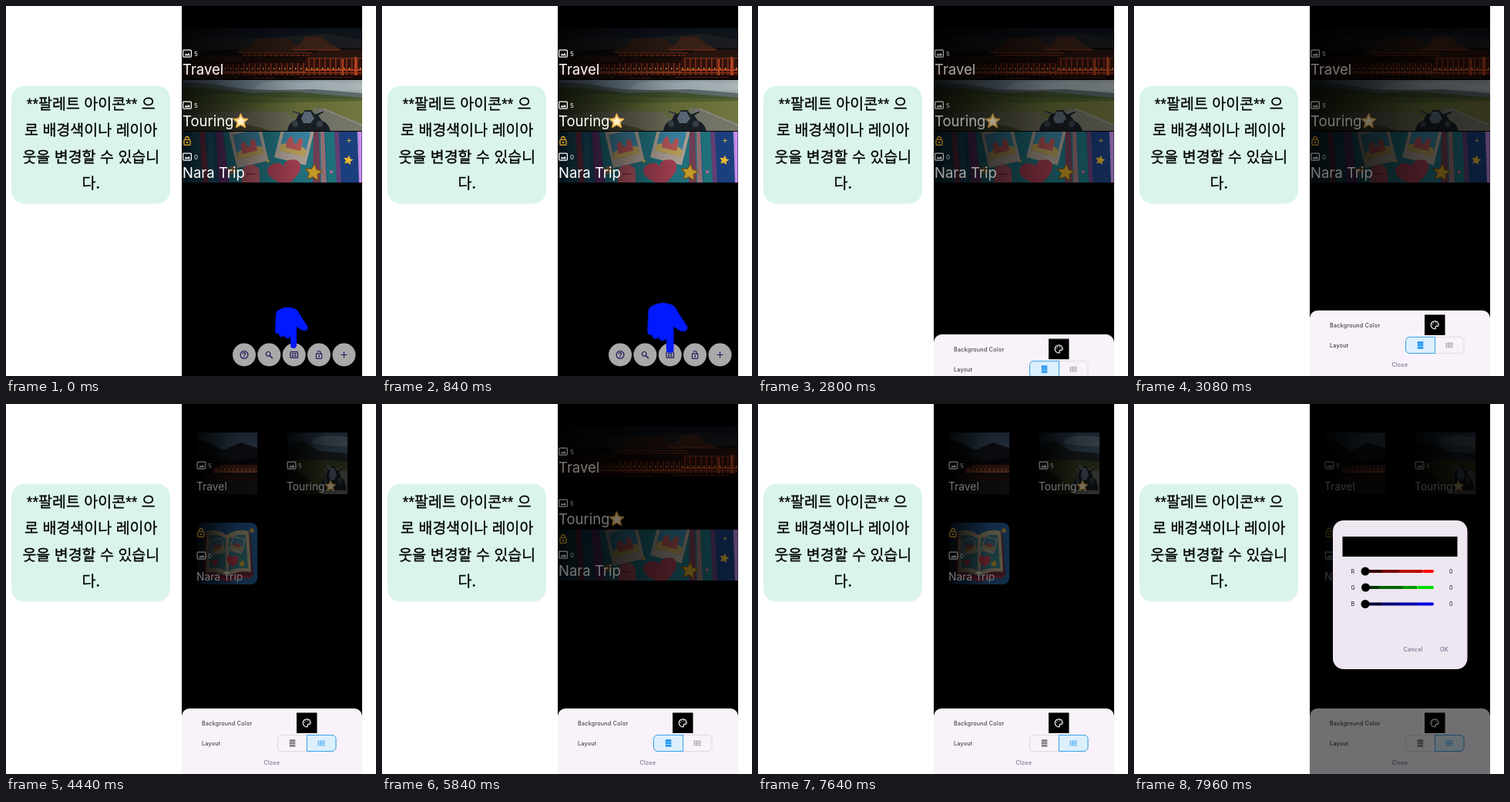
An HTML page that plays this animation: 480 px wide and 480 px high, repeating every 8000 ms.

```html
<!DOCTYPE html>
<html lang="ko">
<head>
<meta charset="utf-8">
<title>Palette icon guide</title>
<style>
html, body { margin: 0; width: 100%; height: 100%; overflow: hidden; background: #fff; }
svg { display: block; width: 100vw; height: 100vh; }
.guide { font: 19.5px "Noto Sans CJK KR", "Noto Sans CJK", sans-serif; text-anchor: middle; stroke: #000; stroke-width: .3; }
.star-mark { font-family: "Liberation Sans", sans-serif; }
.title { font: 18.5px Inter, sans-serif; fill: #fff; }
.grid .title { font-size: 13.8px; }
.count { font: 8px Inter, sans-serif; fill: #fff; }
.label { font: 7.2px Inter, sans-serif; letter-spacing: .27px; fill: #1f1b22; }
.action { fill: #62597a; }
.line { fill: none; stroke: currentColor; stroke-width: 1.2; stroke-linejoin: round; stroke-linecap: round; }

.hand, .sheet, .dim, .list, .grid, .late, .dialog, .dim2 { animation: 8s linear infinite; }
.hand { animation-name: tap; transform-box: fill-box; transform-origin: center; }
.sheet { animation-name: rise; }
.dim { animation-name: dim; }
.list { animation-name: list; animation-timing-function: step-end; }
.grid { animation-name: grid; animation-timing-function: step-end; }
.late { animation-name: late; animation-timing-function: step-end; }
.dialog { animation-name: appear; }
.dim2 { animation-name: dim2; }

@keyframes tap {
  0%, 6% { transform: scale(1); opacity: 1; animation-timing-function: ease-in-out; }
  11.25% { transform: scale(1.23); animation-timing-function: ease-in-out; }
  16.5% { transform: scale(1); }
  16.99% { opacity: 1; }
  17%, 100% { transform: scale(1); opacity: 0; }
}
@keyframes rise {
  0%, 32.5% { transform: translateY(86px); animation-timing-function: ease-out; }
  38%, 100% { transform: none; }
}
@keyframes dim {
  0%, 32.5% { opacity: 0; animation-timing-function: ease-out; }
  38%, 100% { opacity: .54; }
}
@keyframes list { 0% { opacity: 1; } 51.5% { opacity: 0; } 73% { opacity: 1; } 84.5%, 100% { opacity: 0; } }
@keyframes grid { 0% { opacity: 0; } 51.5% { opacity: 1; } 73% { opacity: 0; } 84.5%, 100% { opacity: 1; } }
@keyframes late { 0% { opacity: 1; } 73% { opacity: 0; } 73.5%, 100% { opacity: 1; } }
@keyframes appear { 0%, 95.5% { opacity: 0; animation-timing-function: ease-out; } 98.5%, 100% { opacity: 1; } }
@keyframes dim2 { 0%, 95.5% { opacity: 0; animation-timing-function: ease-out; } 98.5%, 100% { opacity: .54; } }
</style>
</head>
<body>
<svg viewBox="0 0 480 480" preserveAspectRatio="none">
<defs>
  <linearGradient id="night" x2="0" y2="1"><stop stop-color="#0d121b"/><stop offset=".6" stop-color="#16171a"/><stop offset="1" stop-color="#120705"/></linearGradient>
  <linearGradient id="day" x2="1"><stop stop-color="#7d96ad"/><stop offset=".5" stop-color="#8fa3b2"/><stop offset="1" stop-color="#a3acae"/></linearGradient>
  <linearGradient id="field" x2="1" y2=".3"><stop stop-color="#59603a"/><stop offset=".5" stop-color="#6c743b"/><stop offset="1" stop-color="#74763f"/></linearGradient>
  <linearGradient id="dusk" x2="0" y2="1"><stop stop-color="#3c5470"/><stop offset="1" stop-color="#6a7b8d"/></linearGradient>
  <linearGradient id="shade" x2="1"><stop stop-opacity=".8"/><stop offset=".3" stop-opacity=".5"/><stop offset=".65" stop-opacity=".1"/><stop offset="1" stop-opacity="0"/></linearGradient>
  <pattern id="posts" width="7" height="24" patternUnits="userSpaceOnUse">
    <path fill="#32120b" d="M0 0h7v24H0z"/><path fill="#8a3218" d="M0 0h1.500v24H0zM0 9h7v1.500H0z"/><path fill="#e09a55" d="M4 3h1.400v2.500H4z"/>
  </pattern>
  <clipPath id="band"><path d="M229 0h232.500v66H229z"/></clipPath>
  <clipPath id="tile"><path d="M0 0h78v80H0z"/></clipPath>
  <clipPath id="screen"><path d="M228 0h234v480H228z"/></clipPath>
  <path id="star" d="M0-10 2.900-3.800 9.700-3 4.700 1.600 6 8.300 0 5-6 8.300-4.700 1.600-9.700-3-2.900-3.800z" stroke-linejoin="round"/>
  <g id="emoji">
    <use href="#star" fill="#f0b653" stroke="#f0b653" stroke-width="1"/>
    <use href="#star" fill="#fff0c8" transform="scale(.68)"/>
  </g>
  <path id="heart" d="M0 9C-14 0-10-10-4-9-1-9 0-6 0-5 0-6 1-9 4-9 10-10 14 0 0 9z"/>
  <g id="pic" class="line"><rect x=".6" y=".6" width="10.800" height="9" rx="1.200"/><path d="M2.500 7.700 4.700 5l1.500 1.700L8 4.300l2 3.400z" fill="currentColor" stroke="none"/></g>
  <g id="lock" class="line"><rect x="-4" y="-1.500" width="8" height="6.800" rx="1"/><path d="M-2.300-1.500v-1.600a2.300 2.300 0 0 1 4.600 0v1.600"/><circle cy="1.900" r=".6"/></g>
  <g id="unlock" class="line"><rect x="-4" y="-1.500" width="8" height="6.800" rx="1"/><path d="M2.300-1.500v-1.800A2.300 2.300 0 0 0-2.200-3.700"/><circle cy="1.900" r=".6"/></g>
  <g id="palette" class="line"><path d="M0-5a5 5 0 0 0 0 10c1.300 0 1.500-1 1-1.700-.6-1 0-1.800 1-1.800h1.200C4.400 1.500 5 .7 5-.4 5-3 2.700-5 0-5z"/><path d="M-2.900-.6h.1M-1.400-2.700h.1M1.300-2.700h.1M2.900-.8h.1"/></g>
  <g id="bars" fill="currentColor"><path d="M-3.800-4.800h7.600v2.700h-7.600zM-3.800-1.400h7.600v2.700h-7.600zM-3.800 2h7.600v2.700h-7.600z"/></g>
  <path id="dots" fill="none" stroke="currentColor" stroke-width="1.500" stroke-dasharray="1.500 .9" d="M-4.400-2.500h8.700M-4.400 0h8.700M-4.400 2.500h8.700"/>
  <g id="bike">
    <path fill="#1a2127" d="M-25 24c0-10 6-15 11-16l3-7-9-3 1-2 13 4 4-5h8l4 5 11-4 1 2-7 4 5 7c6 2 11 8 11 16z"/>
    <path fill="#5f6f7c" d="M-7 6-3-3H5l5 9-5 6H-4z"/><circle cx="-15" cy="13" r="4" fill="#39434a"/><circle cx="17" cy="13" r="4" fill="#39434a"/>
    <path stroke="#8b979e" d="M-20-3l10 4M11 0l10-4"/>
  </g>
  <g id="photo">
    <path fill="#b9ab9f" d="M-21-24h42v47h-42z"/><path fill="#3f8aa8" d="M-17-20h34v33h-34z"/>
    <path fill="#c3a95e" d="M-17 13V5q8-6 17-2 9-5 17 1v9z"/><path fill="#c05a5c" d="M-10 7v-11l4-5 4 5v3h5v-5l4-4 3 4v13z"/>
  </g>
</defs>

<path fill="#fff" d="M0 0h480v480H0z"/>
<rect x="7" y="103.500" width="206" height="153" rx="17" fill="#daf4ed"/>
<g class="guide">
  <text x="110.300" y="133.500"><tspan class="star-mark">**</tspan>팔레트 아이콘<tspan class="star-mark">**</tspan> 으</text>
  <text x="110.300" y="168">로 배경색이나 레이아</text>
  <text x="110.300" y="202.500">웃을 변경할 수 있습니</text>
  <text x="110.300" y="237">다.</text>
</g>

<g clip-path="url(#screen)">
  <path d="M228 0h234v480H228z"/>

  <g class="list" color="#fff">
    <g transform="translate(0 29)" clip-path="url(#band)">
      <path fill="url(#night)" d="M229 0h233v67H229z"/>
      <path fill="#1b1d20" d="M229 17l40-8 40 5 60-4 50-3 43 8v35H229z"/>
      <path fill="#100d0c" d="M229 32l60-5 173-2v42H229z"/>
      <path fill="#28130d" d="M229 44l25-8h50l14 8z"/>
      <path fill="url(#posts)" d="M229 46h90v17h-90z" opacity=".8"/>
      <path fill="url(#posts)" d="M308 34h154v29H308z"/>
      <path fill="#2f1c15" d="M296 31l20-8 10-10h40l10 9 17 8z"/>
      <path fill="#3d2218" d="M368 27l15-8 5-8h22l8 8 18 9z"/>
      <path fill="#29150f" d="M388 38l19-10h55v10z"/>
      <path fill="#6c2d1a" d="M302 31h96v1.500h-96zM372 27h62v1.500h-62zM394 38h68v1.500h-68z"/>
      <path fill="#1c0d0a" d="M306 36h82v9h-82z"/>
      <path fill="#b5441f" d="M388 53h74v2h-74zM436 40h2v23h-2zM452 37h3v27h-3z"/>
      <path fill="#9a4a24" d="M229 56h160v1.200H229z"/>
      <path fill="#140806" d="M229 61h233v6H229z"/>
      <path fill="#52200f" d="M240 63h60v1h-60zM320 64h30v1h-30zM380 63h70v1h-70z"/>
      <path fill="url(#shade)" d="M229 0h233v67H229z"/>
    </g>
    <g class="late"><g transform="translate(0 96)" clip-path="url(#band)">
      <path fill="url(#day)" d="M229 0h233v67H229z"/>
      <path fill="#b2bcc2" d="M330 4q28-5 52 0 34-5 52 1l28-1v9H320z" opacity=".6"/>
      <path fill="#5d6b6c" d="M229 3l38 2 44 7 42 1 46-1 63 5v20H229z"/>
      <path fill="#455530" d="M229 9l42 2 47 6 55-2 89 8v16H229z"/>
      <path fill="#53632f" d="M229 20l62-2 70 5 101 1v12H229z"/>
      <path fill="url(#field)" d="M229 34q52-6 115-4l118-3v40H229z"/>
      <path fill="#76745f" d="M229 46q60-8 132-5l40 26H229z"/><path fill="#4d5034" d="M229 55q60-8 118 12H229z"/>
      <path fill="#77786b" d="M398 36l15 1 49 19v11h-60z"/><path stroke="#a09f87" d="M411 37l51 22" fill="none"/>
      <use href="#bike" transform="translate(390 44)"/>
      <path fill="url(#shade)" d="M229 0h233v67H229z"/>
    </g></g>
    <g transform="translate(0 163)" clip-path="url(#band)">
      <path fill="#1c5f86" d="M229 0h233v67H229z"/>
      <path fill="#28728e" d="M240 0h10l5 67h-17zM260 0h8l3 67h-8z"/>
      <path fill="#9b4468" d="M251 0h7l5 67h-8z"/><path fill="#743c80" d="M272 0h9l9 67h-14z"/>
      <path fill="#237a87" d="M282 0h128v67H290z"/>
      <use href="#photo" transform="translate(315 20) rotate(-13)"/>
      <use href="#photo" transform="translate(374 16) rotate(14)"/>
      <use href="#heart" fill="#ae4358" transform="translate(362 54) rotate(-12) scale(2.300 1.700)"/>
      <path fill="#bd5a68" d="M306 67V53q2-10 12-10t11 10v14z"/><path fill="#8a3a4e" d="M312 54h11v2h-11z"/>
      <path fill="#a27e44" d="M287 48l9-4 4 8-9 4z"/>
      <path fill="#774159" d="M399 0h7l2 67h-10z"/><path fill="#9a7479" d="M408 0h5l3 67h-7z"/>
      <path fill="#1f7680" d="M414 0h12l3 67h-12z"/><path fill="#674079" d="M426 0h6l3 67h-6z"/>
      <path fill="#1c407f" d="M432 0h23l3 67h-23z"/><path fill="#c98bea" d="M456 0h6v67h-4z"/>
      <use href="#star" fill="#d3a52b" stroke="#73521b" transform="translate(399 53) rotate(8) scale(1.150)"/>
      <use href="#star" fill="#eebd32" transform="translate(444 37) rotate(12) scale(.65)"/>
      <path stroke="#e5b846" d="M445 9v5M442.500 11.500h5"/>
      <circle cx="340" cy="38" r="2" fill="#d1a94e"/><circle cx="422" cy="52" r="2" fill="#d5689a"/>
      <path fill="url(#shade)" d="M229 0h233v67H229z"/>
    </g>
    <use href="#pic" x="229" y="56.500"/><use href="#pic" x="229" y="123.500"/><use href="#pic" x="229" y="190.500"/>
    <g class="count"><text x="244" y="64.500">5</text><text x="244" y="131.500">5</text><text x="244" y="198.500">0</text></g>
    <g class="title"><text x="229" y="88.500">Travel</text><text x="229" y="155.500">Touring</text><text x="229" y="222.500">Nara Trip</text></g>
    <use href="#emoji" transform="translate(304.500 149.500)"/>
    <use href="#lock" transform="translate(235 175)" color="#f5b32d"/>
  </g>

  <g class="grid" color="#fff">
    <g transform="translate(248 37)" clip-path="url(#tile)">
      <path fill="url(#dusk)" d="M0 0h78v80H0z"/>
      <path fill="#171c23" d="M0 8l18 6 16 9 22-10 22 7v60H0z"/>
      <path fill="#0c0e11" d="M0 27l22 3 20 7 36-5v48H0z"/>
      <path fill="#5d2a1a" d="M20 46l15-4h43v11H20z"/><path fill="#b85a35" d="M22 50h56v1.500H22z"/>
      <path stroke="#c48556" stroke-width="3" stroke-dasharray="1.500 4" d="M24 48h54"/>
      <path fill="#2c1714" d="M9 55h69v8H9z"/><path fill="#1b1e23" d="M0 63h78v17H0z"/>
      <path fill="url(#shade)" d="M0 0h78v80H0z"/>
    </g>
    <g transform="translate(365 37)" clip-path="url(#tile)">
      <path fill="url(#dusk)" d="M0 0h78v80H0z"/>
      <path fill="#87939d" d="M33 8q20-7 45-2v13l-45-4z" opacity=".6"/>
      <path fill="#232d30" d="M0 15l20-4 20 13 38 3v53H0z"/>
      <path fill="#454c29" d="M0 37q35-5 78 1v42H0z"/><path fill="#262b1b" d="M0 49q26-2 44 31H0z"/>
      <path fill="#696b64" d="M51 42l27 9v29H45z"/>
      <use href="#bike" transform="translate(58 49) scale(.6 1.050)"/>
      <path fill="url(#shade)" d="M0 0h78v80H0z"/>
    </g>
    <g transform="translate(248 154)" clip-path="url(#tile)">
      <rect width="78" height="80" rx="8" fill="#2765a0"/>
      <path fill="#174373" d="M0 8h9v64H0z"/><path fill="#702f45" d="M9 13l29 4 31-5 4 57-35 6-32-7z"/>
      <path fill="#c9b997" d="M12 11q15-4 26 5 13-9 29-5l3 53q-19-3-31 6-13-8-28-5z"/>
      <path fill="#3f8a94" d="M15 16q13-2 22 5v41q-10-5-21-3zM41 21q10-7 22-5l3 43q-15-1-25 4z"/>
      <use href="#photo" transform="translate(26 31) rotate(-13) scale(.42)"/><use href="#photo" transform="translate(52 29) rotate(14) scale(.42)"/>
      <use href="#heart" fill="#d6475c" transform="translate(46 50) scale(.8)"/><use href="#heart" fill="#d6475c" transform="translate(23 52) scale(.5)"/>
      <use href="#star" fill="#eebc3c" transform="translate(58 53) scale(.5)"/><use href="#star" fill="#eebc3c" transform="translate(71 10) scale(.4)"/>
      <path fill="#a82f44" d="M13 68q14-3 25 5 14-7 32-4v3q-17-2-31 5-14-6-26-4z"/>
      <path fill="url(#shade)" d="M0 0h78v80H0z"/>
    </g>
    <use href="#pic" x="247.500" y="74.500"/><use href="#pic" x="364.500" y="74.500"/><use href="#pic" x="247.500" y="191.500"/>
    <g class="count"><text x="262" y="82.500">5</text><text x="379" y="82.500">5</text><text x="262" y="199.500">0</text></g>
    <g class="title"><text x="247" y="111.500">Travel</text><text x="364" y="111.500">Touring</text><text x="247" y="228.500">Nara Trip</text></g>
    <use href="#emoji" transform="translate(421 106.500) scale(.75)"/>
    <use href="#lock" transform="translate(253 167)" color="#f5b32d"/>
  </g>

  <g fill="#a9a9a9"><circle cx="309" cy="452.500" r="15"/><circle cx="341.300" cy="452.500" r="15"/><circle cx="373.700" cy="452.500" r="15"/><circle cx="406" cy="452.500" r="15"/><circle cx="438.500" cy="452.500" r="15"/></g>
  <g color="#21195c" class="line">
    <g transform="translate(309 452.500)"><circle r="4.900"/><path d="M-1.600-1.200a1.600 1.600 0 1 1 2.500 1.300Q0 .6 0 1.300M0 2.800v.1"/></g>
    <g transform="translate(341.300 452.500)"><circle cx="-1.200" cy="-1.200" r="2.800"/><path d="M1 1 4.200 4.200" stroke-width="1.500"/></g>
    <g transform="translate(373.700 452.500)"><rect x="-4.800" y="-3.800" width="9.600" height="7.600" rx="1"/><path fill="currentColor" stroke="none" d="M-2.800-2.200h2.300v1.800h-2.300zM.5-2.200h2.300v1.800H.5zM-2.800.5h2.300v1.800h-2.300zM.5.5h2.300v1.800H.5z"/></g>
    <use href="#unlock" transform="translate(406 452.500) scale(.93)"/>
    <path d="M435.200 452.500h6.600M438.500 449.200v6.600"/>
  </g>

  <path class="dim" d="M228 0h234v480H228z"/>

  <g class="sheet">
    <path fill="#f9f2fa" d="M228 490v-85a10 10 0 0 1 10-10h214a10 10 0 0 1 10 10v85z"/>
    <g class="label"><text x="254" y="416.500">Background Color</text><text x="254" y="442.500">Layout</text><text class="action" x="334.500" y="468">Close</text></g>
    <path d="M377 400.500h26.500V427H377z"/>
    <use href="#palette" transform="translate(390.200 413.800)" color="#fff"/>
    <rect x="352.500" y="429.500" width="75.500" height="21" rx="5" fill="none" stroke="#ded8e0"/>
    <g class="list">
      <path fill="#dceffc" stroke="#35a2e8" d="M357.500 429.500h33v21h-33a5 5 0 0 1-5-5v-11a5 5 0 0 1 5-5z"/>
      <use href="#bars" transform="translate(371.500 440)" color="#2196f3"/><use href="#dots" transform="translate(409 440)" color="#858087"/>
    </g>
    <g class="grid">
      <path fill="#dceffc" stroke="#35a2e8" d="M390.500 429.500H423a5 5 0 0 1 5 5v11a5 5 0 0 1-5 5h-32.500z"/>
      <use href="#bars" transform="translate(371.500 440)" color="#858087"/><use href="#dots" transform="translate(409 440)" color="#2196f3"/>
    </g>
  </g>

  <path class="dim2" d="M228 0h234v480H228z"/>
  <g class="dialog">
    <rect x="258" y="151" width="174.500" height="193" rx="14" fill="#eee6f0"/>
    <path d="M270.500 172h149v26h-149z"/>
    <g fill="none" stroke-width="4">
      <path stroke="#300" d="M300 217h22"/><path stroke="#700" d="M322 217h22"/><path stroke="#b00" d="M344 217h30"/><path stroke="#f00" stroke-linecap="round" d="M376 217h11"/>
      <path stroke="#030" d="M300 238h18"/><path stroke="#060" d="M318 238h31"/><path stroke="#090" d="M349 238h18"/><path stroke="#0d0" stroke-linecap="round" d="M369 238h18"/>
      <path stroke="#003" d="M300 259.500h22"/><path stroke="#007" d="M322 259.500h22"/><path stroke="#00a" d="M344 259.500h24"/><path stroke="#00d" stroke-linecap="round" d="M369 259.500h18"/>
    </g>
    <circle cx="300" cy="217" r="5.500"/><circle cx="300.500" cy="238" r="5.500"/><circle cx="300" cy="259.500" r="5.500"/>
    <g class="label">
      <text x="281.500" y="219.800">R</text><text x="281.500" y="241">G</text><text x="281.500" y="262.300">B</text>
      <text x="409" y="219.800">0</text><text x="409" y="241">0</text><text x="409" y="262.300">0</text>
      <text class="action" x="349.500" y="320.800">Cancel</text><text class="action" x="397" y="320.800">OK</text>
    </g>
  </g>

  <path class="hand" fill="#0019ff" d="M350 399Q351 395 356 393 364 389 373 392 379 394 381 400L391 415Q393 419 389 421 385 422 381 419L377 416V440Q377 444 373 444 369 444 369 440V428Q368 432 364 431 361 430 361 427 359 430 356 429 354 428 354 425 349 426 349 421z"/>
</g>
</svg>
</body>
</html>
```
